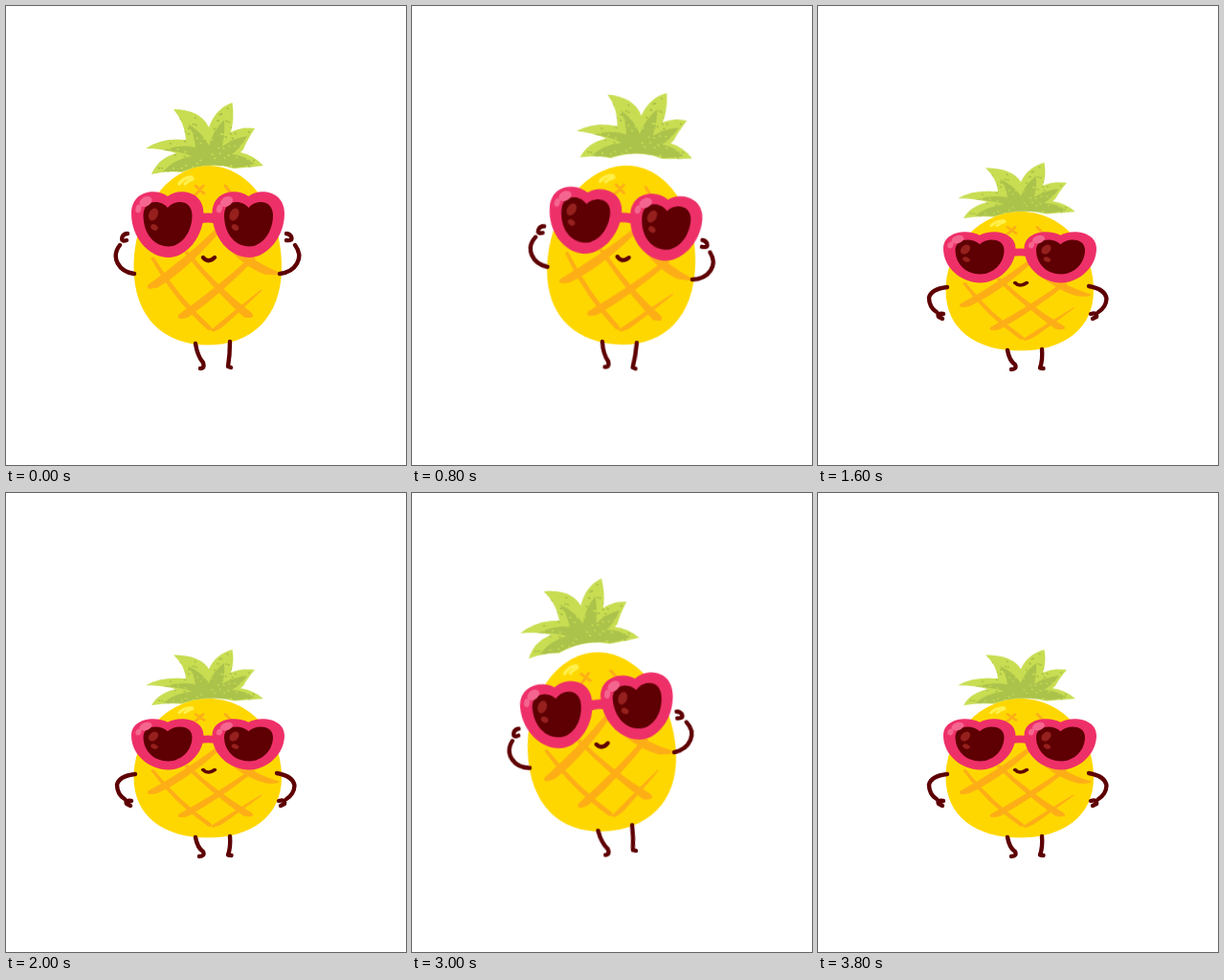
Recreate the animation shown at these times as an HTML page. Size 418 by 480 pixels, loop 4 s.

```html
<!DOCTYPE html>
<html lang="en">
<head>
<meta charset="utf-8">
<title>Dancing pineapple</title>
<style>
  html, body { margin: 0; width: 100%; height: 100%; overflow: hidden; background: #fff; }
  svg { display: block; width: 418px; height: 480px; }

  .pose { transform-origin: 210px 391px; animation: dance 4s step-end infinite; }
  .crown { animation: toss 4s step-end infinite; }
  .raised { animation: raised 4s step-end infinite; }
  .lowered { animation: lowered 4s step-end infinite; }

  .line { fill: none; stroke: #5e0003; stroke-width: 4.4; stroke-linecap: round; stroke-linejoin: round; }
  .grid { fill: #fdae17; stroke: #fdae17; stroke-width: 1.2; stroke-linejoin: round; }

  /* crouch, lean left, crouch, lean right */
  @keyframes dance {
    0% { transform: none; }
    5%, 15%, 25%, 40%, 50%, 60%, 70%, 80%, 90%, 100% { transform: translateY(-2.2px) scaleY(.776); }
    10%, 35%, 55%, 75% { transform: translate(.5px, -1.3px) rotate(-6.2deg); }
    20%, 45%, 65%, 85% { transform: translate(-2.5px, -1px) rotate(5deg); }
  }
  @keyframes toss {
    0%, 5%, 15%, 25%, 40%, 50%, 60%, 70%, 80%, 90%, 100% { transform: none; }
    10%, 35%, 55%, 75% { transform: translate(-6.5px, -10px); }
    20%, 45%, 65%, 85% { transform: translate(6px, -13px); }
  }
  @keyframes raised {
    0%, 10%, 20%, 35%, 45%, 55%, 65%, 75%, 85% { opacity: 1; }
    5%, 15%, 25%, 40%, 50%, 60%, 70%, 80%, 90%, 100% { opacity: 0; }
  }
  @keyframes lowered {
    0%, 10%, 20%, 35%, 45%, 55%, 65%, 75%, 85% { opacity: 0; }
    5%, 15%, 25%, 40%, 50%, 60%, 70%, 80%, 90%, 100% { opacity: 1; }
  }
</style>
</head>
<body>
<svg viewBox="0 0 418 480">
  <defs>
    <path id="leaves" d="M152 176Q159 159 178 154Q163 149 146 149Q163 137 188 140Q187 122 175 108Q203 108 212 127Q219 107 236.500 101Q239 117 235 132Q246 126 260 128Q252 140 248 150L245 153Q259 156 269 167Q250 169 238 170Q212 162 184 174Q168 172 152 176Z"/>
    <path id="core" d="M164 173Q176 160 194 157Q180 151 164 151Q184 144 198 148Q197 135 190 123Q206 133 212 146Q217 129 228 119Q229 136 226 147Q238 138 252 136Q245 149 236 155Q249 156 260 165Q246 169 238 169Q212 162 184 173Z"/>
    <clipPath id="leavesClip"><use href="#leaves"/></clipPath>
    <clipPath id="coreClip"><use href="#core"/></clipPath>
    <g id="lens">
      <path fill="#ee3069" d="M169 199C180 190 206.500 193 206.500 217C206.500 242 188 263 170 263C149 263 131 242 131 217C131 193 157 190 169 199Z"/>
      <path fill="#5e0003" d="M169 211C176 202 194.500 202 194.500 219C194.500 238 182 251.500 170 251.500C154 251.500 143.500 237 143.500 219C143.500 202 162 202 169 211Z"/>
      <g fill="#f4668f">
        <ellipse cx="146" cy="204.500" rx="7" ry="5" transform="rotate(-30 146 204.500)"/>
        <ellipse cx="138.500" cy="212" rx="3" ry="4.500" transform="rotate(15 138.500 212)"/>
      </g>
      <g fill="#95201d">
        <ellipse cx="154" cy="218" rx="4.600" ry="6.800" transform="rotate(25 154 218)"/>
        <ellipse cx="155" cy="231.500" rx="4" ry="3" transform="rotate(35 155 231.500)"/>
      </g>
    </g>
  </defs>

  <g class="pose">
    <g class="crown">
      <use href="#leaves" fill="#c9dd52"/>
      <path id="darkDots" clip-path="url(#leavesClip)" fill="none" stroke="#a6bf45" stroke-width="1.7" stroke-linecap="round"/>
      <use href="#core" fill="#abc34b"/>
      <path id="lightDots" clip-path="url(#coreClip)" fill="none" stroke="#c9dd52" stroke-width="1.5" stroke-linecap="round"/>
    </g>

    <path fill="#ffd700" d="M212 167C252 167 288 212 288 273C288 326 256 354.500 211 354.500C165 354.500 133.500 326 133.500 273C133.500 212 172 167 212 167Z"/>
    <g class="grid">
      <path d="M149 292Q188 264 218 235L221 238Q188 276 158 294Q146 297 149 292Z"/>
      <path d="M181 323Q222 294 257 262L260 264Q226 299 190 325Q178 329 181 323Z"/>
      <path d="M267 297Q242 321 225 336Q213 343 216 338Q240 318 267 297Z"/>
      <path d="M152 264Q176 307 211 338Q216 340 214 336Q180 305 154 263Z"/>
      <path d="M187 258Q218 297 249 325Q261 327 256 321Q221 295 190 257Z"/>
      <path d="M219 236Q243 270 270 280Q284 282 285 279Q252 266 222 234Z"/>
      <path d="M206 188Q201 195 195 200M198 188Q202 192 207 196M229 188Q233 193 237 199" fill="none" stroke-width="3" stroke-linecap="round"/>
    </g>
    <path fill="none" stroke="#fff04d" stroke-width="3.500" stroke-linecap="round" stroke-linejoin="round" d="M181 186Q186 179 194 179M187 186Q190 183 195 181"/>

    <path d="M202 222.500Q211 220.500 220 222.500" fill="none" stroke="#ee3069" stroke-width="10"/>
    <use href="#lens"/>
    <use href="#lens" x="84.500"/>
    <path class="line" d="M206 263Q211 269.500 218 263"/>

    <g class="line raised">
      <path d="M134 280C118 278 109 263 119 250"/>
      <path d="M126 245Q120 247 121.500 241.500Q123 238 127 238"/>
      <path d="M286 280C303 278 312 263 302 250"/>
      <path d="M293 245Q300 246 298 241Q296 238 293 238"/>
      <path d="M198 353Q200 366 206 373Q208 379 203 379"/>
      <path d="M234 351Q234 365 232 377L235 378"/>
    </g>
  </g>

  <g class="line lowered">
    <path d="M135 294Q118 296 116 305Q116 315 124 320"/>
    <path d="M131 322Q124 321 126 325L130 327"/>
    <path d="M283 293Q300 296 301.500 306Q301 315 293 320"/>
    <path d="M285 322Q292 320 291 325L287 327"/>
    <path d="M198 360Q200 371 206 375Q208 380 202 380"/>
    <path d="M234 359Q235 370 232 378.500L235.500 379"/>
  </g>
</svg>
<script>
  // Seeded speckles, clipped to the leaves.
  let seed = 7;
  const random = () => (seed = seed * 16807 % 2147483647) / 2147483647;

  function speckle(id, count) {
    let d = "";
    for (let i = 0; i < count; i++) {
      const x = 146 + random() * 122;
      const y = 103 + random() * 72;
      d += `M${x.toFixed(1)} ${y.toFixed(1)}l.8 .5`;
    }
    document.getElementById(id).setAttribute("d", d);
  }
  speckle("darkDots", 90);
  speckle("lightDots", 130);
</script>
</body>
</html>
```
